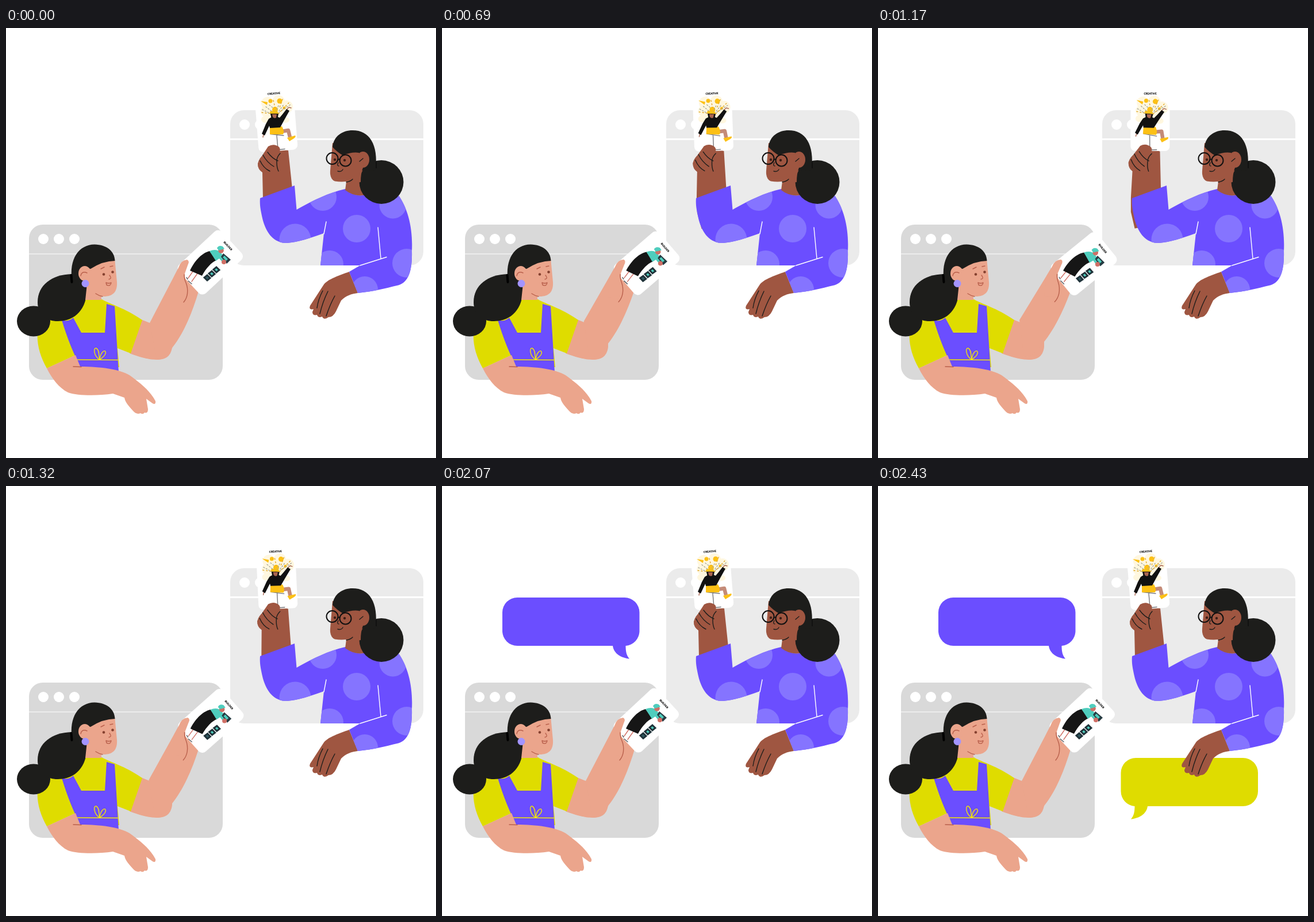
An HTML page for the animation above (2.91 s loop, 748 by 748 pixels).

```html
<!DOCTYPE html>
<html lang="en">
<head>
<meta charset="utf-8">
<title>Two colleagues sharing cards</title>
<style>
  html, body { margin: 0; width: 100%; height: 100%; overflow: hidden; background: #fff; }
  svg { display: block; width: 100%; height: 100%; }
  .ink { fill: #1d1d1b; }
  .violet { fill: #6b4eff; }
  .lime { fill: #dfdc00; }
  .peach { fill: #eba58c; }
  .brown { fill: #9f5641; }
  .white { fill: #fff; }
  .teal { fill: #4fcdbd; }
  .gold { fill: #fcc015; }
  .line { fill: none; stroke-width: 1.4; stroke-linecap: round; stroke-linejoin: round; }
  .warm { stroke: #b9604c; }
  .dark { stroke: #1d1d1b; }
  text { font: 900 4.7px Lato, "Open Sans", sans-serif; text-anchor: middle; fill: #000; }
</style>
</head>
<body>
<svg viewBox="0 0 748 748">
  <defs>
    <path id="bubble" d="M131 194H317.500A26 26 0 0 1 343.500 220V252A26 26 0 0 1 319.500 278C319.500 288 321 295 326 300.500C312 299 299 292 297 278H131A26 26 0 0 1 105 252V220A26 26 0 0 1 131 194Z"/>
    <path id="sweater" d="M442 296L502 274L505.500 316C532 301 560 287 590 280Q607 295 627 290L682 290C700 315 708 350 706 388C707 425 699 444 680 448C660 453 640 458 612 461L597 424L616 413H547L553 357C530 365 505 374 485 374C462 372 452 352 447 335C443 318 441 308 442 296Z"/>
    <clipPath id="sweaterClip"><use href="#sweater"/></clipPath>
  </defs>

  <!-- windows -->
  <rect x="40" y="342" width="337" height="270" rx="24" fill="#d9d9d9"/>
  <path d="M40 393H377" stroke="#fff"/>
  <g class="white">
    <circle cx="65" cy="367" r="9"/><circle cx="92" cy="367" r="9"/><circle cx="119" cy="367" r="9"/>
  </g>
  <rect x="390" y="143" width="336" height="270" rx="24" fill="#ebebeb"/>
  <path d="M390 193.500H726" stroke="#fff" stroke-width="3"/>
  <g class="white"><circle cx="415" cy="168" r="9"/><circle cx="442" cy="168" r="9"/></g>

  <use id="blueBubble" class="violet" href="#bubble"/>
  <g id="limeBubble"><use class="lime" href="#bubble" transform="translate(766 279) scale(-1 1)"/></g>

  <!-- right woman: raised forearm with card -->
  <g id="rightArm">
    <path class="brown" d="M447 297L446 251Q438 246 438 236Q440 226 448 221L457 206Q470 198 480 210L491 213L498 280L492 340L458 350L449 322Z"/>
    <g transform="translate(466 114) rotate(-4.500)">
      <rect class="white" x="-34" y="-9" width="68" height="109" rx="8"/>
      <text y="1.700">CREATIVE</text>
    </g>
    <g fill="#fff7df">
      <circle cx="455" cy="131" r="11"/><circle cx="474" cy="128" r="11"/><circle cx="488" cy="137" r="11"/>
      <ellipse cx="467" cy="145" rx="24" ry="14"/><ellipse cx="451" cy="159" rx="7" ry="6"/><ellipse cx="486" cy="160" rx="7" ry="5"/>
    </g>
    <g class="gold">
      <path d="M443 127L455 129L454 134Z"/>
      <circle cx="460" cy="127" r="3.500"/><circle cx="476" cy="127" r="4.500"/>
      <circle cx="468" cy="142" r="5"/><circle cx="462" cy="147" r="3"/><circle cx="484" cy="139" r="2.500"/>
    </g>
    <path class="line" stroke="#a8a99c" stroke-width="1.500" stroke-dasharray="2 3" d="M446 142L462 150M452 137L465 147M469 146L475 133M472 148L484 132M476 146L495 133M458 134L466 140"/>
    <path class="line" stroke="#e0a92e" stroke-width="1.200" stroke-dasharray="2 4" d="M445 147L462 149M465 126L468 138M481 124L476 138M474 149L493 129"/>
    <path class="line" stroke="#77777b" stroke-width="3" d="M471 187L473 210M460 184.500L483 187M472 212L485 210.500"/>
    <path d="M479 180L491 178L494 190" fill="none" stroke="#c48b78" stroke-width="6.500" stroke-linejoin="round"/>
    <path class="gold" d="M489 191L503 187Q505 189 501 192L493 197Z"/>
    <path class="line" stroke="#a96551" stroke-width="3.500" d="M448 185L447 190M488 142L492 138L496 139"/>
    <path class="gold" d="M459 173L480 171Q485 180 482 185L459 185Z"/>
    <path d="M457 158Q467 151 476 156L481 150L488 141L493 144L484 160L477 173L459 174L458 170L450 187L445 184L452 167Z" fill="#111"/>
    <path d="M460 149H474L472 160Q467 163 462 159Z" fill="#111"/>
    <path d="M463 150H471L470 156Q467 158 464 155Z" fill="#a96551"/>
    <path class="gold" d="M460 149Q464 144 472 145L474 149Z"/>
    <path class="brown" d="M443 226L456 206Q466 200 475 207Q479 211 474 220L474 250L446 251Q438 246 438 236Z"/>
    <path class="line dark" d="M455 216Q463 227 473 231M447 221Q454 234 466 241M442 231Q448 244 459 249M477 218Q470 225 471 234Q471 243 474 249"/>
  </g>

  <!-- right woman: body -->
  <path class="brown" d="M597 424C580 430 560 437 553 446L529 483Q526 491 535 489L533 494Q533 501 541 499Q543 505 550 502Q553 509 561 503Q569 503 574 493L583 474C592 465 600 463 612 461Z"/>
  <path class="line dark" d="M551 457Q543 472 541 487M560 458Q551 476 546 497M572 466Q564 480 557 501"/>
  <use class="violet" href="#sweater"/>
  <g clip-path="url(#sweaterClip)" fill="#8574ff">
    <circle cx="551" cy="294" r="24"/><circle cx="503" cy="368" r="27.500"/><circle cx="610" cy="349" r="24"/>
    <circle cx="563" cy="411" r="24"/><circle cx="673" cy="308" r="23.500"/><circle cx="697" cy="409" r="25"/>
    <circle cx="624" cy="455" r="23"/>
  </g>
  <path class="line" stroke="#fff" d="M557 337L553 358M647 347L652 401M616 413L662 398.500"/>
  <path class="brown" d="M568 200L564 248Q563 263 572 266.500Q582 268 592 267L590 282Q607 295 627 290L630 215Z"/>
  <ellipse class="ink" cx="653" cy="268" rx="38.500" ry="38"/>
  <path class="ink" d="M568 207C570 188 585 178 603 178C632 178 648 202 643 247L617 248Q614 229 614 217Q602 215 586 221.500Q576 216 568 207Z"/>
  <ellipse class="brown" cx="621" cy="229" rx="11" ry="14"/>
  <path class="brown" d="M606 222H622L621 243Q617 252 617 268L606 270Z"/>
  <path class="line dark" d="M615 232L621 227M578 234Q575 240 579 240M577 249Q583 251 586 246M592 268Q599 267 603 263"/>
  <g fill="none" stroke="#111" stroke-width="2">
    <circle cx="567.500" cy="227" r="10"/><circle cx="590.500" cy="230.500" r="10"/>
    <path d="M577 228L581 229M644 232V244"/>
  </g>
  <g fill="#3d1f17"><circle cx="572" cy="229" r="2.200"/><circle cx="589" cy="230" r="2.200"/></g>

  <!-- left woman: raised arm with card -->
  <path class="peach" d="M230 505L250 513L289 545V555C287 570 279 577 262 577C247 577 232 572 215 566Z"/>
  <g id="leftArm">
    <path class="peach" d="M250 513L300 417Q304 404 317 403L335 458C325 492 310 530 290 555C281 570 272 576 262 576Z"/>
    <g transform="translate(386 379) rotate(47)">
      <rect class="white" x="-34" y="-9" width="68" height="102" rx="9"/>
      <text y="1.700">BUILDER</text>
    </g>
    <path class="line" stroke="#cf6f66" stroke-width="6" stroke-linecap="butt" d="M326 422L317 435M333 427L323 441"/>
    <path class="line" stroke="#575b60" stroke-width="4" d="M314 434L316 437M317 440L323 445"/>
    <path d="M354 388L366 404C357 408 348 418 341 431L320 422C327 407 339 392 354 388Z" fill="#161616"/>
    <path class="teal" d="M354 388Q366 383 373 390L381 400L377 408L371 401L365 405Z"/>
    <circle cx="374" cy="387" r="4.800" fill="#cf6f66"/>
    <path class="teal" d="M367 383Q370 377 377 380L380 384L370 387Z"/>
    <path d="M378 392L391 403L384 410L374 398Z" fill="#263b42"/>
    <path class="teal" d="M380 396L386 402L383 405L377 399Z"/>
    <circle cx="379" cy="407" r="4" fill="#cf6f66"/>
    <g stroke="#1f3239" stroke-width="3" class="teal">
      <path d="M366 416L371 421L366 425L361 420ZM358 423L363 428L358 432L353 427Z"/>
      <path d="M350 430L355 435L350 439L345 434Z" fill="#315b63"/>
    </g>
    <path class="peach" d="M292 433L300 417Q304 404 315 403Q320 405 316 413L311 427Q310 437 317 448L315 468L290 470Z"/>
    <path class="line warm" d="M310 429Q310 437 313 443C318 456 316 469 309 477"/>
  </g>

  <!-- left woman: body -->
  <path class="lime" d="M138 472L167 472C182 481 205 486 237 508L217 566L194 557L197 590H130L121 569L71 592C54 562 49 530 62 503Z"/>
  <path class="violet" d="M97 508Q108 512 117 504L131 530H172L175 480L189 484L196 599L130 591C118 568 106 538 97 508Z"/>
  <g class="line" stroke="#f2e500" stroke-width="3">
    <path d="M123 577L195 577.500M163 577C153 571 151 556 157 557C163 560 161 570 163 577C164 565 171 559 173 563C175 568 168 573 163 577"/>
  </g>
  <path class="peach" d="M71 592L121 569L129 589C165 589 199 594 215 604C237 620 251 632 260 649Q261 656 255 653L244 645L247 663Q247 671 241 669Q238 673 234 670Q227 673 221 666C212 656 207 650 206 643L186 636C160 640 125 640 108 634C92 626 80 610 71 592Z"/>
  <path class="line warm" d="M117 589L131 589.500"/>
  <ellipse class="ink" cx="48" cy="510" rx="29" ry="26.500"/>
  <path class="ink" d="M114 428C80 429 55 447 55 477C55 500 71 510 90 510C121 510 141 488 141 452L130 430Z"/>
  <path class="peach" d="M146 400H189L193 442C194 459 186 467 170 467L166 466V473H138L141 445Z"/>
  <path class="ink" d="M115 441C109 401 127 377 154 376.500C175 377 189 388 189.500 405Q169 405 147 419L133 416Q125 424 129 436Z"/>
  <ellipse class="peach" cx="137" cy="427" rx="11" ry="13"/>
  <path d="M113.500 430L114.500 442" stroke="#000" stroke-width="4" stroke-linecap="round"/>
  <circle cx="138" cy="444.500" r="6.500" fill="#a394ff"/>
  <path class="line warm" d="M130 431Q132 422 141 426M180 430Q185 436 179 437M174 443Q179 445 183 443Q182 450 175 447ZM156 462Q162 466 168 467M165 419L171 416M181 415L186 414"/>
  <g fill="#84402f"><circle cx="170" cy="428.500" r="2.300"/><circle cx="185.500" cy="424.500" r="2.300"/></g>
</svg>
<script>
  const LOOP = 2910, STEP = 30, POP = 350;
  const byId = id => document.getElementById(id);
  const clamp = v => Math.max(0, Math.min(1, v));

  // time, right angle, right shift, left angle, left shift
  const poses = [
    [480, 0, 0, 0, 0],
    [690, 2.4, -1.3, 2.3, -0.4],
    [930, 3.3, 2.3, 3.1, 3.4],
    [1170, 4.6, -1.8, 3.9, 0.8],
    [1410, 0, 0, 0, 0]
  ];

  function poseAt(t) {
    const next = poses.findIndex(p => p[0] > t);
    if (next < 1) return poses[0];
    const a = poses[next - 1], b = poses[next];
    const k = (t - a[0]) / (b[0] - a[0]);
    return a.map((v, i) => v + (b[i] - v) * k);
  }

  const swing = (id, angle, shift, x, y) =>
    byId(id).setAttribute("transform", `translate(${shift} 0) rotate(${angle} ${x} ${y})`);

  function pop(id, t, start, x, y) {
    const u = clamp((t - start) / POP) - 1;
    const scale = 1 + 2.75 * u ** 3 + 1.75 * u ** 2;
    byId(id).setAttribute("transform", `translate(${x} ${y}) scale(${scale}) translate(${-x} ${-y})`);
    byId(id).style.display = u > -1 ? "" : "none";
  }

  function draw(t) {
    const [, rightAngle, rightShift, leftAngle, leftShift] = poseAt(t);
    swing("rightArm", rightAngle, rightShift, 470, 230);
    swing("leftArm", leftAngle, leftShift, 320, 440);
    pop("blueBubble", t, 1390, 224.25, 247);
    pop("limeBubble", t, 2075, 541.75, 526);
  }

  const begin = performance.now();
  function tick() {
    const t = (performance.now() - begin) % LOOP;
    draw(Math.floor(t / STEP) * STEP);
    requestAnimationFrame(tick);
  }
  tick();
</script>
</body>
</html>
```
